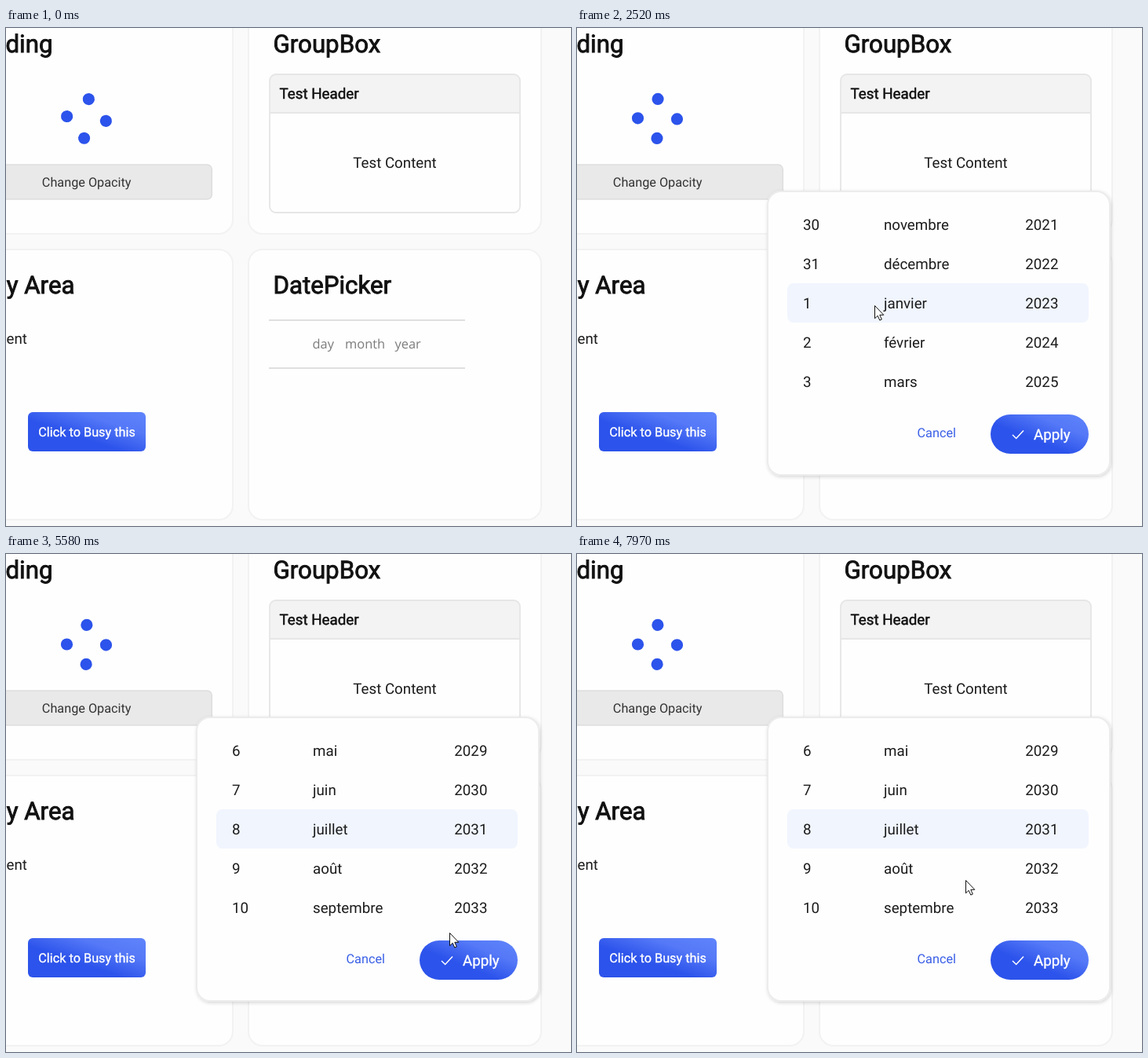
An HTML page for the animation above (8 s loop, 720 px wide and 634 px high).

```html
<!DOCTYPE html>
<html lang="en">
<head>
<meta charset="utf-8">
<title>Date picker</title>
<style>
html, body { margin: 0; width: 100%; height: 100%; overflow: hidden; background: #fafafa; }
svg { display: block; width: 100%; height: 100%; }
text { font: 18.75px Roboto, sans-serif; fill: #1c1c1c; text-rendering: geometricPrecision; white-space: pre; }
.h1 { font-size: 31.25px; fill: #111; stroke: #111; stroke-width: .9px; }
.semi { fill: #111; stroke: #111; stroke-width: .5px; }
.small { font-size: 16.25px; }
.white { fill: #fff; stroke: #fff; stroke-width: .35px; }
.link { fill: #3a5fe6; }
.date text { font: 16.4px "Open Sans", sans-serif; }
.empty text { fill: #7c7c7c; }
.end { text-anchor: end; }
.mid { text-anchor: middle; }
.card { fill: #fefefe; stroke: #f2f2f2; stroke-width: 2; }
</style>
</head>
<body>
<svg viewBox="0 0 720 634">
  <defs>
    <linearGradient id="blue" x1="0" y1="1" x2="1" y2="0">
      <stop offset=".4" stop-color="#2c53eb"/>
      <stop offset=".72" stop-color="#5579f7"/>
      <stop offset="1" stop-color="#5f84fb"/>
    </linearGradient>
    <filter id="shadow" x="-10%" y="-10%" width="120%" height="120%">
      <feDropShadow dx="1" dy="1.5" stdDeviation="2" flood-color="#000" flood-opacity=".16"/>
    </filter>
    <clipPath id="label"><path d="M40 495H164.5V535H40Z"/></clipPath>
  </defs>

  <rect width="720" height="634" fill="#fafafa"/>
  <rect class="card" x="-100" y="-100" width="389" height="362" rx="18"/>
  <rect class="card" x="309" y="-100" width="373" height="362" rx="18"/>
  <rect class="card" x="-100" y="282" width="389" height="344" rx="18"/>
  <rect class="card" x="309" y="282" width="373" height="344" rx="18"/>

  <text class="h1 end" x="59.5" y="31">Loading</text>
  <text class="h1" x="340.5" y="31">GroupBox</text>
  <text class="h1 end" x="87.5" y="338">Busy Area</text>
  <text class="h1" x="340.5" y="338">DatePicker</text>

  <g id="spinner" fill="#2c53eb">
    <circle cy="-25" r="7.6"/><circle cx="25" r="7.6"/>
    <circle cy="25" r="7.6"/><circle cx="-25" r="7.6"/>
  </g>
  <rect x="-60" y="174" width="322.3" height="44" rx="6" fill="#e9e9e9" stroke="#dedede" stroke-width="1.6"/>
  <text class="small mid" x="102.7" y="202" style="fill:#333">Change Opacity</text>

  <path d="M336 108V67a8 8 0 0 1 8-8H647a8 8 0 0 1 8 8V108Z" fill="#f3f3f3"/>
  <path d="M336 108H655" stroke="#e6e6e6" stroke-width="2"/>
  <rect x="336" y="59" width="319" height="176" rx="8" fill="none" stroke="#e6e6e6" stroke-width="1.8"/>
  <text class="semi" x="348.5" y="90">Test Header</text>
  <text class="mid" x="495.5" y="178">Test Content</text>

  <text class="end" x="27" y="402">Content</text>
  <rect x="28" y="489" width="150" height="50" rx="6" fill="url(#blue)"/>
  <text class="small white" x="41.3" y="520" clip-path="url(#label)">Click to Busy this</text>

  <path id="lines" d="M335 372H585M335 433H585" stroke="#dfdfdf" stroke-width="2"/>
  <rect id="hover" x="335" y="372" width="250" height="61" fill="#f9f9f9"/>
  <g id="blank" class="date empty">
    <text x="390.5" y="408">day</text><text x="432" y="408">month</text><text x="495.5" y="408">year</text>
  </g>
  <g id="chosen" class="date">
    <text x="402.5" y="408">8</text><text x="426" y="408">juillet</text><text x="479.5" y="408">2031</text>
  </g>

  <g id="popup">
    <rect x="243" y="208" width="436" height="361" rx="17" fill="#fefefe" stroke="#ececec" stroke-width="2" filter="url(#shadow)"/>
    <rect x="268" y="325" width="384" height="50" rx="8" fill="#f0f5fe"/>
    <g id="rows"></g>
    <text class="small link" x="433.5" y="521">Cancel</text>
    <rect x="527" y="492" width="125" height="50" rx="25" fill="url(#blue)"/>
    <path d="M555 518l4.7 4.5 9.3-10" fill="none" stroke="#fff" stroke-width="1.5"/>
    <text class="white" x="582" y="524">Apply</text>
  </g>

  <path id="cursor" d="M0 0V16.3L3.7 12.8 6.3 18.6 8.8 17.5 6.3 11.8H11.3Z" fill="#fff" stroke="#111" stroke-width="1"/>
</svg>
<script>
const LOOP = 8000;
const SPIN = 1195;
const MONTHS = ["janvier", "février", "mars", "avril", "mai", "juin", "juillet",
  "août", "septembre", "octobre", "novembre", "décembre"];

// Pointer stops: time, x, y
const POINTER = [
  [330, 598, 640], [980, 451.5, 425.5], [1500, 451.5, 425.5], [2250, 379.5, 353.5],
  [2960, 379.5, 353.5], [3140, 302.5, 335.5], [3640, 302.5, 335.5], [4150, 592, 352],
  [5050, 592, 352], [5580, 565.5, 482.5], [5780, 583.5, 505.5], [6940, 583.5, 505.5],
  [7400, 495.5, 415.5], [LOOP, 495.5, 415.5]
];
// First part of a turn: ms, degrees
const RISE = [[0, .7], [65, 11.5], [200, 42.8], [395, 96], [525, 180]];

const $ = id => document.getElementById(id);
const mod = (a, n) => ((a % n) + n) % n;
const clamp = (v, a, b) => Math.min(b, Math.max(a, v));
const smooth = u => u * u * (3 - 2 * u);
const show = (id, on) => $(id).setAttribute("display", on ? "inline" : "none");
const place = (id, x, y, more = "") => $(id).setAttribute("transform", `translate(${x} ${y})${more}`);

function sample(stops, t, ease = u => u) {
  if (t <= stops[0][0]) return stops[0].slice(1);
  const i = stops.findIndex(s => s[0] > t);
  if (i < 0) return stops[stops.length - 1].slice(1);
  const a = stops[i - 1], b = stops[i];
  const u = ease((t - a[0]) / (b[0] - a[0]));
  return a.slice(1).map((v, k) => v + (b[k + 1] - v) * u);
}

function spinAngle(t) {
  const p = mod(t - 800, SPIN);
  if (p <= 525) return sample(RISE, p)[0];
  const left = 1 - (p - 525) / (SPIN - 525);
  return 360 - 179.3 * left * left;
}

// Wheel notches turned since the given time
const notches = (t, from, gap, max) => clamp(Math.floor((t - from) / gap) + 1, 0, max);

const cells = [-2, -1, 0, 1, 2].map(row => [288, 391, 571.3].map(x => {
  const el = document.createElementNS("http://www.w3.org/2000/svg", "text");
  el.setAttribute("x", x);
  el.setAttribute("y", 357 + row * 50);
  $("rows").append(el);
  return { el, row };
}));

function drawRows(t) {
  const day = notches(t, 3180, 50, 5) + notches(t, 3460, 65, 2);
  const month = notches(t, 2590, 60, 6);
  const year = 2023 + notches(t, 4220, 90, 8);
  for (const [d, m, y] of cells) {
    d.el.textContent = mod(day + d.row, 31) + 1;
    m.el.textContent = MONTHS[mod(month + m.row, 12)];
    y.el.textContent = year + y.row;
  }
}

function draw(t) {
  const [x, y] = sample(POINTER, t, smooth);
  const open = (t >= 1400 && t < 5900) || t >= 7560;
  const over = !open && x > 335 && x < 585 && y > 372 && y < 433;
  place("spinner", 102.5, 115.4, ` rotate(${spinAngle(t)})`);
  place("cursor", x, y);
  show("cursor", t >= 330);
  show("popup", open);
  show("hover", over);
  show("lines", !over);
  show("blank", t < 5900);
  show("chosen", t >= 5900);
  drawRows(t);
}

const start = performance.now();
function tick() {
  draw((performance.now() - start) % LOOP);
  requestAnimationFrame(tick);
}
tick();
</script>
</body>
</html>
```
